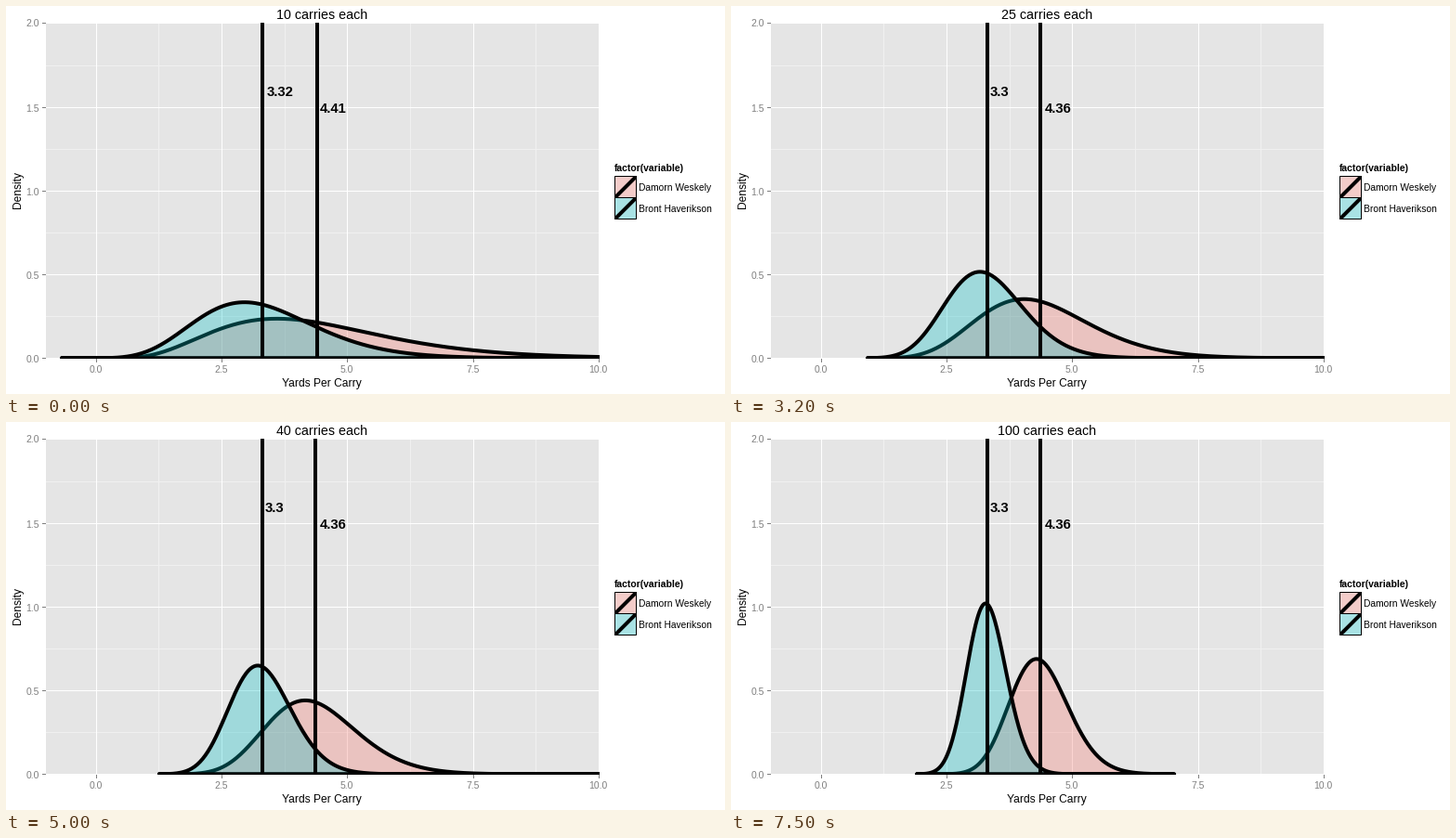
A matplotlib script that plays this animation: 774x418 px, repeating every 8 s.

```python
import math

import numpy as np
import matplotlib.pyplot as plt
from matplotlib.animation import FuncAnimation
from matplotlib.patches import Rectangle

W, H, DPI = 774, 418, 64
PT = 72 / DPI                      # points per pixel
LEFT, RIGHT, TOP, BOTTOM = 43, 639, 18, 380
X0, SX = 96.85, 54.1               # pixel of x = 0, pixels per yard
Y0, SY = 379.4, 180.5              # pixel of y = 0, pixels per density unit
STEP, LOOP = 100, 8000             # ms

# start ms, carries, low mean, high mean, first and last yards of the curves
STAGES = [
    (0, 10, 3.32, 4.41, -.69, 12),
    (1500, 15, 3.31, 4.34, .08, 12),
    (2500, 20, 3.31, 4.37, .3, 12),
    (3200, 25, 3.304, 4.36, .92, 12),
    (4100, 30, 3.31, 4.38, 1.02, 12),
    (5000, 40, 3.304, 4.36, 1.25, 12),
    (5900, 50, 3.296, 4.35, 1.25, 8.5),
    (6700, 75, 3.304, 4.36, 1.76, 8.2),
    (7500, 100, 3.304, 4.36, 1.9, 7.02),
]

# Spread and skew of a single carry
LOW, HIGH = (3.93, 1.9), (5.85, 2.8)


def density(x, mean, carries, spread, skew):
    """Shifted gamma: the mean of many skewed carries."""
    k = 4 * carries / skew ** 2
    scale = spread / math.sqrt(carries * k)
    t = np.maximum((x - mean) / scale + k, 1e-9)
    return np.exp((k - 1) * np.log(t) - t - math.lgamma(k)) / scale


def px(x):
    return X0 + SX * x


def py(y):
    return Y0 - SY * y


plt.rcParams["font.family"] = "Liberation Sans"
fig = plt.figure(figsize=(W / DPI, H / DPI), dpi=DPI, facecolor="white")
ax = fig.add_axes([0, 0, 1, 1])
ax.set_xlim(0, W)
ax.set_ylim(H, 0)
ax.axis("off")


def text(x, y, s, size, color="black", **kw):
    kw = {"ha": "left", "va": "baseline", **kw}
    return ax.text(x, y, s, fontsize=size * PT, color=color, **kw)


def line(xs, ys, color, width, **kw):
    kw = {"solid_capstyle": "butt", "snap": False, **kw}
    return ax.plot(xs, ys, color=color, lw=width * PT, **kw)[0]


def box(x, y, w, h, color, **kw):
    return ax.add_patch(Rectangle((x, y), w, h, fc=color, snap=False, **kw))


panel = box(LEFT, TOP, RIGHT - LEFT, BOTTOM - TOP, "#e5e5e5", lw=0, zorder=0)

# Grid, ticks and axis labels
GREY = "#7f7f7f"
for k in range(9):
    major = k % 2 == 0
    color, z = ("white", 1.1) if major else ("#f0f0f0", 1)
    gx = round(px(1.25 * k)) + .5
    gy = round(py(.25 * k)) + .5
    line([gx, gx], [TOP, BOTTOM], color, 1, zorder=z)
    line([LEFT, RIGHT], [gy, gy], color, 1, zorder=z)
    if major:
        line([gx, gx], [BOTTOM, BOTTOM + 4], GREY, 1)
        line([LEFT - 4, LEFT], [gy, gy], GREY, 1)
        text(gx - 1, 395, f"{1.25 * k:.1f}", 10.4, GREY, ha="center")
        text(36, gy + 4, f"{.25 * k:.1f}", 10.4, GREY, ha="right")

text(340, 410, "Yards Per Carry", 12, ha="center")
text(13.5, 198.5, "Density", 12, ha="center", va="center", rotation=90)
title = text(340, 14, "", 14.3, ha="center")

# Legend
RED, BLUE = "#f8766d", "#00bfc4"
text(655, 178.5, "factor(variable)", 10.4, weight="bold")
for y, color, name in [(183.5, RED, "Damorn Weskely"),
                       (206.5, BLUE, "Bront Haverikson")]:
    box(655.5, y, 23, 23, "#f2f2f2", lw=0, zorder=1)
    box(655.5, y, 23, 23, color, lw=0, alpha=.3, zorder=2)
    slash = line([655, 679], [y + 23.5, y - .5], "black", 4, zorder=3,
                 solid_capstyle="projecting")
    slash.set_clip_path(Rectangle((655, y - .5), 24, 24,
                                  transform=ax.transData))
    box(655.5, y, 23, 23, "none", ec="black", lw=PT, zorder=4)
    text(681, y + 15.5, name, 10.3)

# Densities, mean lines and mean labels
shapes = []
for z, color in [(5, RED), (6, BLUE)]:
    area = ax.fill([0, 1, 1], [0, 0, 1], color=color, alpha=.3, lw=0,
                   zorder=z)[0]
    edge = line([], [], "black", 4, zorder=z + .5, solid_capstyle="round",
                solid_joinstyle="round")
    for part in (area, edge):
        part.set_clip_path(panel)
    shapes.append((area, edge))

means = [line([0, 0], [TOP, BOTTOM], "black", 4, zorder=8) for _ in range(2)]
low_label = text(0, 97, "", 14.7, weight="bold", zorder=9)
high_label = text(337.5, 115, "", 14.7, weight="bold", zorder=9)


def draw(frame):
    stage = [s for s in STAGES if s[0] <= frame * STEP][-1]
    _, carries, low, high, first, last = stage
    title.set_text(f"{carries} carries each")

    yards = np.linspace(first, last, 400)
    x = px(yards) + .5
    for (area, edge), mean, kind in zip(shapes, (high, low), (HIGH, LOW)):
        y = py(density(yards, mean, carries, *kind))
        outline = np.column_stack([np.r_[x, x[-1], x[0]], np.r_[y, Y0, Y0]])
        area.set_xy(outline)
        edge.set_data(*outline.T)

    for mark, mean in zip(means, (low, high)):
        mark.set_xdata([round(px(mean))] * 2)
    low_text = f"{low:.3g}"
    low_label.set_text(low_text)
    low_label.set_x(round(px(low)) + 2.5 * len(low_text) - 5)
    high_label.set_text(f"{high:.3g}")
    return [title, low_label, high_label, *means]


anim = FuncAnimation(fig, draw, frames=LOOP // STEP, interval=STEP,
                     repeat=True, repeat_delay=0, blit=False)
plt.show()
```
